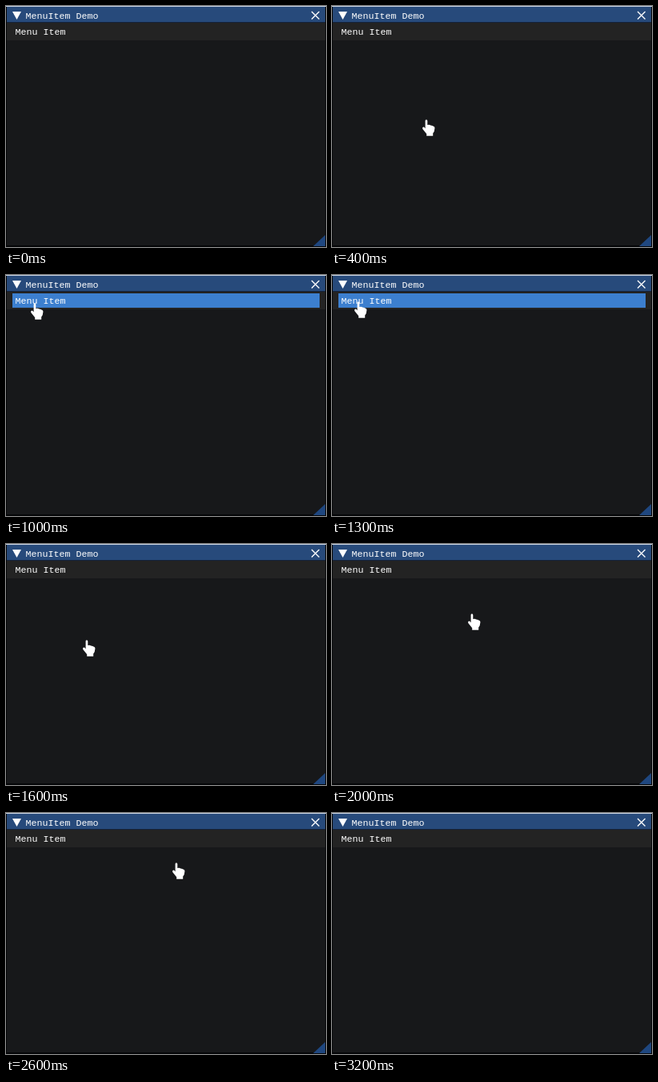
An HTML page for the animation above (4400 ms loop, 400 by 302 pixels).

```html
<!DOCTYPE html>
<html lang="en">
<head>
<meta charset="utf-8">
<title>MenuItem Demo</title>
<style>
  html, body { margin: 0; width: 100%; height: 100%; overflow: hidden; background: #000; }
  svg { display: block; width: 400px; height: 302px; }
  text { font: 11.667px "Liberation Mono", monospace; fill: #fff; white-space: pre; }
</style>
</head>
<body>
<svg viewBox="0 0 400 302">
  <g shape-rendering="crispEdges">
    <rect width="400" height="302" fill="#050608"/>
    <rect x="1" y="1" width="398" height="299" fill="#17181a"/>
    <rect width="400" height="1" fill="#ccd6e4"/>
    <rect x="1" y="1" width="398" height="19" fill="#274a7b"/>
    <rect x="1" y="20" width="398" height="1" fill="#14213a"/>
    <rect x="1" y="21" width="398" height="22" fill="#232323"/>
    <rect id="hover" x="8" y="23" width="384" height="18" fill="#3c7fcf"/>
  </g>
  <path d="M8 7H19L13.5 17Z" fill="#fff"/>
  <path d="M382 7L391.5 16.5M391.5 7L382 16.5" stroke="#fff" stroke-width="1.4"/>
  <path d="M384 301L399 287V301Z" fill="#1f4780"/>
  <text x="24.5" y="16">MenuItem Demo</text>
  <text x="11.5" y="36">Menu Item</text>
  <path id="hand" fill="#fff" d="M3.6 2Q3.6 .6 4.9 .6T6.3 2V7L8.3 6.8 10.3 7.6 12.3 8 14.4 9.1Q15.6 9.8 15.4 11.3L14.7 15.2 13.2 17.5V20.8H5.2V18.2L.4 12.2Q-.3 10.8 .6 9.9T2.6 10.2L3.6 11.4Z"/>
</svg>
<script>
const LOOP = 4400, STEP = 100;

// Pointer stops; bow and pow shape the way to the next stop.
const stops = [
  { at: 100, x: 192, y: 246 },
  { at: 700, x: 33, y: 37 },
  { at: 1300, x: 28, y: 33, bowY: 92, pow: 0.86 },
  { at: 2200, x: 204, y: 34 },
  { at: 2500, x: 204, y: 34, bowX: 12, pow: 1.14 },
  { at: 3100, x: 196, y: 250 }
];

function pointer(t) {
  const i = stops.findIndex(s => s.at >= t);
  if (i < 0 || t < stops[0].at) return null;
  const b = stops[i], a = stops[i - 1] || b;
  const { bowX = 0, bowY = 0, pow = 1 } = a;
  const u = a === b ? 0 : ((t - a.at) / (b.at - a.at)) ** pow;
  const bow = Math.sin(Math.PI * u);
  return {
    x: Math.round(a.x + (b.x - a.x) * u + bowX * bow),
    y: Math.round(a.y + (b.y - a.y) * u + bowY * bow)
  };
}

const handFrames = [], hoverFrames = [];
for (let t = 0; t <= LOOP; t += STEP) {
  const pos = pointer(t), { x, y } = pos || { x: 0, y: 0 };
  const over = pos && y > 20 && y < 42;
  const base = { offset: t % LOOP ? t / LOOP - 1e-5 : t / LOOP, easing: "step-end" };
  handFrames.push({ ...base, transform: `translate(${x}px, ${y}px)`, opacity: pos ? 1 : 0 });
  hoverFrames.push({ ...base, opacity: over ? 1 : 0 });
}

const timing = { duration: LOOP, iterations: Infinity };
document.getElementById("hand").animate(handFrames, timing);
document.getElementById("hover").animate(hoverFrames, timing);
</script>
</body>
</html>
```
